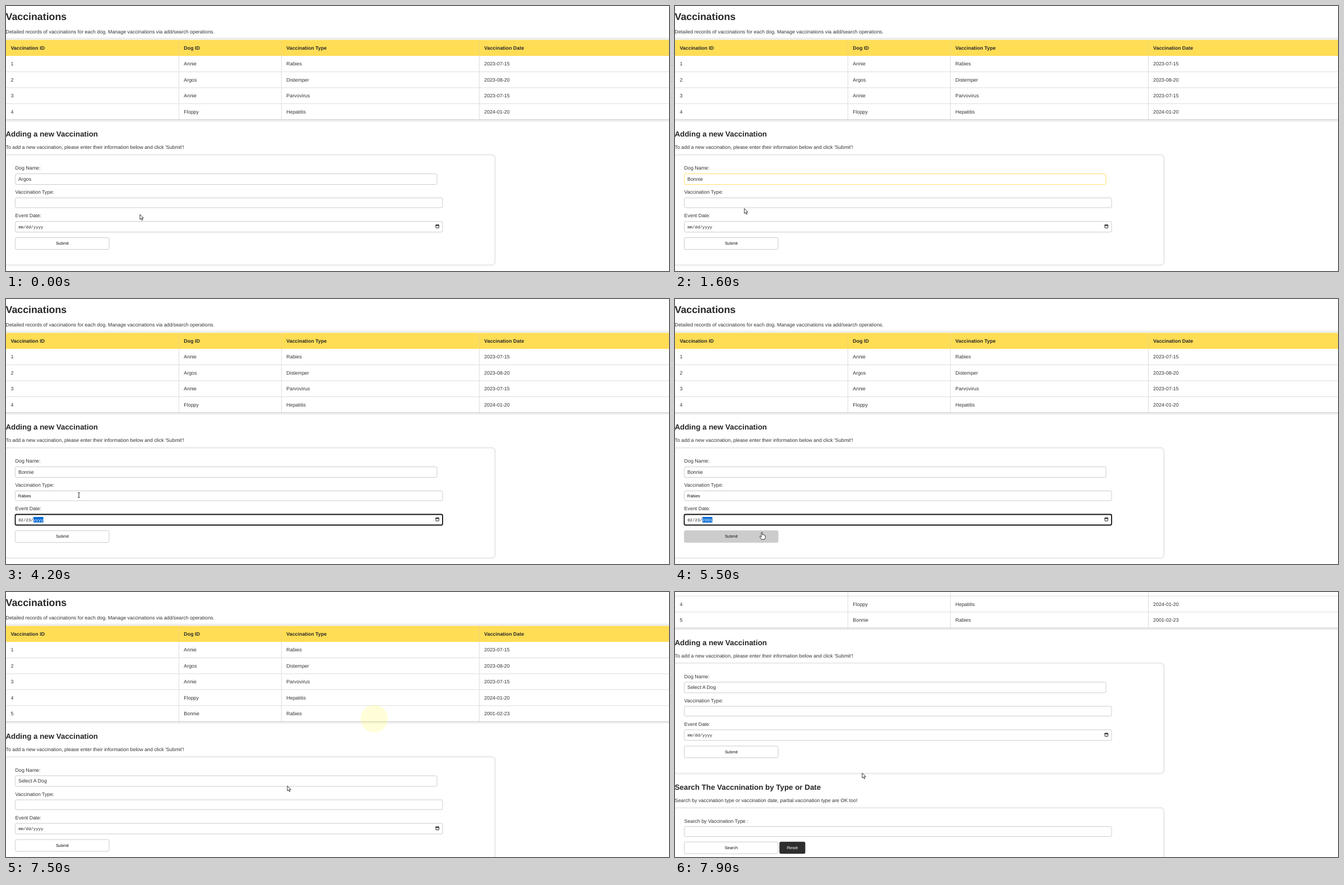
An HTML page for the animation above (8000 ms loop, 1183x473 px).

```html
<!DOCTYPE html>
<html lang="en">
<head>
<meta charset="utf-8">
<title>Vaccinations</title>
<style>
  html, body { margin: 0; width: 100%; height: 100%; overflow: hidden; background: #fff; }
  svg { display: block; width: 1183px; height: 473px; }
  text { font: 8.9px "Liberation Sans", Arial, sans-serif; fill: #333; text-rendering: geometricPrecision; white-space: pre; }
  .h1 { font-size: 17.8px; font-weight: bold; fill: #262626; }
  .h2 { font-size: 13.35px; font-weight: bold; fill: #262626; }
  .th { font-weight: bold; fill: #2a2a2a; }
  .small { font-size: 7.4px; fill: #111; }
  .button { font-size: 7.4px; fill: #111; text-anchor: middle; }
  .mono { font: 7.4px "Liberation Mono", "Courier New", monospace; fill: #222; }
  .light { fill: #fff; }
</style>
</head>
<body>
<svg id="stage" viewBox="0 0 1183 473"></svg>
<script>
const LOOP = 8000, STEP = 100, ROW = 28.45;
const OPEN = 400, PICK = 1200, TYPE = 1900, DATE = 3300, CLICK = 5700, RELOAD = 5900;

const columns = [0, 308.5, 491.5, 844.5];
const header = ["Vaccination ID", "Dog ID", "Vaccination Type", "Vaccination Date"];
const records = [
  ["1", "Annie", "Rabies", "2023-07-15"],
  ["2", "Argos", "Distemper", "2023-08-20"],
  ["3", "Annie", "Parvovirus", "2023-07-15"],
  ["4", "Floppy", "Hepatitis", "2024-01-20"],
  ["5", "Bonnie", "Rabies", "2001-02-23"]
];
const dogs = ["Select A Dog", "Annie", "Argos", "Floppy", "Enzo", "Luna", "Bonnie", "Roy"];

// [time, x, y] of the pointer
const path = [
  [0, 239, 372], [400, 130, 310], [500, 130, 310], [700, 106, 394], [1000, 106, 394],
  [1900, 130, 350], [5000, 130, 350], [5500, 155, 416], [5900, 158, 421],
  [6600, 311, 213], [7300, 657, 226], [7500, 502, 346], [7900, 334, 323]
];
const typed = [[0, ""], [2200, "R"], [2400, "Ra"], [2600, "Rab"], [2700, "Rabi"], [2800, "Rabie"], [2900, "Rabies"], [RELOAD, ""]];
// [time, value, start and end of the selected part]
const dates = [
  [0, "mm/dd/yyyy", 0, 0], [DATE, "mm/dd/yyyy", 0, 2], [3800, "00/dd/yyyy", 0, 2],
  [3900, "02/dd/yyyy", 3, 5], [4100, "02/02/yyyy", 3, 5], [4200, "02/23/yyyy", 6, 10],
  [4300, "02/23/0002", 6, 10], [4500, "02/23/0020", 6, 10], [4600, "02/23/0200", 6, 10],
  [4700, "02/23/2001", 6, 10], [CLICK, "02/23/2001", 0, 0], [RELOAD, "mm/dd/yyyy", 0, 0]
];

const ease = u => { u = Math.min(1, Math.max(0, u)); return u * u * (3 - 2 * u); };
const latest = (list, t) => list.filter(k => k[0] <= t).pop();
const text = (x, y, s, cls = "") => `<text x="${x}" y="${y}" class="${cls}">${s}</text>`;
const box = (x, y, w, h, fill, stroke = "none", r = 0, sw = 1) =>
  `<rect x="${x}" y="${y}" width="${w}" height="${h}" rx="${r}" fill="${fill}" stroke="${stroke}" stroke-width="${sw}"/>`;
const shift = (x, y, s) => `<g transform="translate(${x} ${y})">${s}</g>`;
const card = (y, h) => box(-2.5, y, 875, h, "#fff", "#eee", 6, 3);
const field = (y, w, h, stroke = "#ccc", sw = 1) => box(16.5, y, w, h, "#fff", stroke, 2.5, sw);
const focusable = (y, h, on) => on ? field(y, 762.5, h, "#111", 1.8) : field(y, 762.5, h);

function pointerAt(t) {
  const a = latest(path, t), b = path.find(k => k[0] > t) || a;
  const u = a === b ? 0 : ease((t - a[0]) / (b[0] - a[0]));
  return [a[1] + (b[1] - a[1]) * u, a[2] + (b[2] - a[2]) * u];
}

function table(rows) {
  const bottom = 89 + ROW * rows.length;
  let s = box(-3, 58.5, 1195, bottom - 57, "#fff", "#eee", 0, 4) + box(0, 60.5, 1183, 28.5, "#ffdd55");
  const line = (x, y, w, h, c) => box(x, y, w, h, c);
  columns.forEach((x, i) => {
    const tx = x + (i ? 8.8 : 8.4);
    s += text(tx, 77.6, header[i], "th");
    rows.forEach((r, j) => s += text(tx, 106.2 + ROW * j, r[i]));
    if (i) s += line(x - .5, 60.5, 1, 28.5, "#f0d878") + line(x - .5, 89, 1, bottom - 89, "#ddd");
  });
  rows.forEach((r, j) => s += line(0, 88.5 + ROW * (j + 1), 1183, 1, j < rows.length - 1 ? "#ddd" : "#ccc"));
  return s;
}

function dateField(t) {
  const [, value, from, to] = latest(dates, t), x = 22.2, w = 4.44;
  let s = focusable(384.5, 19, t >= DATE && t < CLICK);
  if (to) s += box(x + from * w, 389, (to - from) * w, 10, "#0a6cd6");
  s += text(x, 396.7, `${value.slice(0, from)}<tspan class="light">${value.slice(from, to)}</tspan>${value.slice(to)}`, "mono");
  return s + box(767, 390.8, 5.4, 5.4, "#fff", "#222", .5) + box(766.6, 390.3, 6.2, 2, "#222");
}

function dropdown(y) {
  const active = y < 318 ? 2 : Math.floor((y - 318.4) / 11.2);
  let s = `<path d="M17 325C10 340 12 400 13 415C40 428 120 425 200 432L480 430L765 429Q774 420 771 404L773 322Z" opacity=".07"/>`;
  s += box(17, 319, 752, 90, "#fff", "#999");
  return s + dogs.map((d, i) =>
    (i === active ? box(17, 386.4 + 11.2 * (i - 6), 752, 11.2, "#1967d2") : "") +
    text(22, 327.1 + 11.2 * i, d, i === active ? "light" : "")).join("");
}

function form(t, y, hover) {
  const open = t >= OPEN && t < PICK, typing = t >= TYPE && t < DATE;
  const dog = t < PICK ? "Argos" : t < RELOAD ? "Bonnie" : dogs[0];
  const caret = typing ? `<tspan dx="-.6">|</tspan>` : "";
  const fill = hover ? "#ccc" : open ? "#e2e2e2" : "#fff";
  return text(-.6, 233.4, "Adding a new Vaccination", "h2") +
    text(-.5, 255.4, "To add a new vaccination, please enter their information below and click 'Submit'!") +
    card(265.5, 197) +
    text(16.6, 292.2, "Dog Name:") + field(299.5, 752.5, 19, t >= OPEN && t < TYPE ? "#ffe070" : "#ccc") + text(22, 311.9, dog) +
    text(16.6, 335.1, "Vaccination Type:") + focusable(342.5, 17.5, typing) + text(21.8, 353.8, latest(typed, t)[1] + caret, "small") +
    text(16.6, 377.1, "Event Date:") + dateField(t) +
    box(16.5, 413.5, 167.5, 21, fill, hover ? "#ccc" : "#ccc", 2.5) + text(100.4, 426.2, "Submit", "button") +
    (open ? dropdown(y) : "");
}

const search = text(-.6, 491.2, "Search The Vaccnination by Type or Date", "h2") +
  text(-.5, 513.4, "Search by vaccination type or vaccination date, partial vaccination type are OK too!") +
  card(523.5, 197) +
  text(16.6, 550.2, "Search by Vaccination Type :") + field(557.2, 762.5, 17.8) +
  box(16.5, 584.7, 167.5, 21, "#fff", "#ccc", 2.5) + text(100.4, 597.6, "Search", "button") +
  box(186.3, 584.3, 46.2, 21.6, "#2e2e2e", "none", 3) + text(209.4, 597.6, "Reset", "button light");

const cursors = {
  arrow: `<path d="M0 0V8.9L2 7.1L3.5 10.4L5 9.7L3.6 6.6H6.3Z" fill="#fff" stroke="#222" stroke-width=".9"/>`,
  beam: `<path d="M-2 -4.5Q0 -4.5 0 -3.5Q0 -4.5 2 -4.5M0 -3.5V3.5M-2 4.5Q0 4.5 0 3.5Q0 4.5 2 4.5" fill="none" stroke="#222"/>`,
  hand: `<path d="M-1 1Q0 -.6 1 1V5Q2.2 4 3 5.3Q4.2 4.6 4.8 5.8Q6.2 5.4 6.2 7V10L5 13H-.8L-3.8 8.6Q-3.8 7 -2.4 7.6L-1 9Z" fill="#fff" stroke="#222" stroke-width=".9"/>`
};

function draw(t) {
  const [x, y] = pointerAt(t);
  const scroll = 167 * ease((t - 7600) / 300), grown = t >= RELOAD ? ROW : 0;
  const fy = y + scroll - grown, open = t >= OPEN && t < PICK;
  const within = (top, bottom, right) => !open && x > 17 && x < right && fy > top && fy < bottom;
  const hover = within(413, 435, 184);
  const kind = hover ? "hand" : within(342, 360, 779) || within(384, 404, 779) ? "beam" : "arrow";
  const page = text(-.5, 25, "Vaccinations", "h1") +
    text(-.5, 49, "Detailed records of vaccinations for each dog. Manage vaccinations via add/search operations.") +
    table(records.slice(0, grown ? 5 : 4)) + shift(0, grown, form(t, y, hover) + search);
  const halo = t >= 7300 && t <= 7500 ? `<circle cx="657" cy="226" r="24.3" fill="#fffa64" opacity=".25"/>` : "";
  stage.innerHTML = shift(0, -scroll, page) + halo + shift(x, y, cursors[kind]);
}

const stage = document.getElementById("stage");
let shown = -1;
function tick() {
  const t = Math.floor(performance.now() % LOOP / STEP) * STEP;
  if (t !== shown) draw(shown = t);
  requestAnimationFrame(tick);
}
tick();
</script>
</body>
</html>
```
